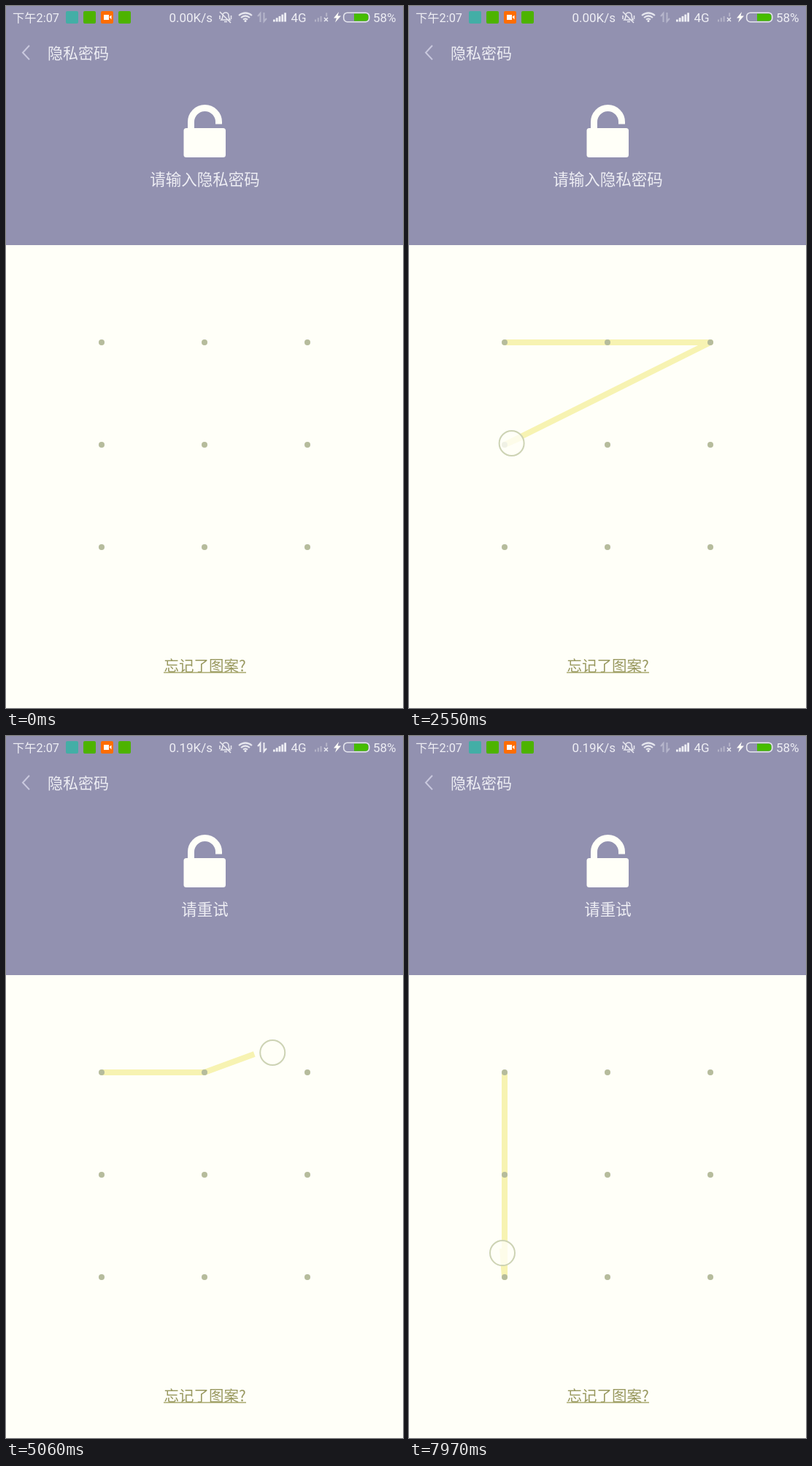
An HTML page for the animation above (8 s loop, 544 by 960 pixels).

```html
<!DOCTYPE html>
<html lang="zh-CN">
<head>
<meta charset="utf-8">
<title>隐私密码</title>
<style>
  html, body { margin: 0; width: 100%; height: 100%; overflow: hidden; background: #fffff8; }
  svg { display: block; width: 544px; height: 960px; }
  text { font-family: Roboto, "Noto Sans CJK SC", "Noto Sans CJK", sans-serif; fill: #eeeef4; }
  .status text { font-size: 17px; }
  .cjk { font-family: "Noto Sans CJK SC", "Noto Sans CJK", sans-serif; }
  .line { fill: none; stroke: #f7f3b2; stroke-width: 8; stroke-linejoin: round; }
  .thin { fill: none; stroke: #e6e6ee; stroke-width: 1.6; }
</style>
</head>
<body>
<svg viewBox="0 0 544 960">
  <rect width="544" height="960" fill="#fffff8"/>
  <rect width="544" height="327" fill="#9291b0"/>

  <g class="status">
    <text x="9" y="21.5" style="font-size:16.3px">下午2:07</text>
    <rect x="82" y="7" width="17" height="17" rx="2" fill="#43aea6"/>
    <rect x="106" y="7" width="17" height="17" rx="2" fill="#4db300"/>
    <rect x="130" y="7" width="17" height="17" rx="2" fill="#ff6d00"/>
    <path d="M134 12h7v7h-7zM141.500 15l3-2.500v6z" fill="#fffff8"/>
    <rect x="154" y="7" width="17" height="17" rx="2" fill="#4db300"/>
    <text id="speed" x="283" y="21.500" text-anchor="end"></text>

    <g class="thin">
      <path d="M295 19q2-2 2-6a4 4 0 0 1 8 0q0 4 2 6zM299 21.500h4M293 8l15 15M293 13v5M308.500 13v5"/>
      <path d="M319 13q9-7 18 0M322 16q6-5 12 0M325 18.700q3-2.500 6 0" stroke-width="2.200"/>
    </g>
    <circle cx="328" cy="20.500" r="1.500" fill="#eeeef4"/>
    <path id="arrows" d="M348.500 22V10l-3.500 4M353.500 9v12l3.500-4" fill="none" stroke="#eeeef4" stroke-width="2"/>
    <g id="bars" fill="#eeeef4"></g>
    <text x="390.500" y="21.500">4G</text>
    <g id="noBars" fill="#b5b4c8"></g>
    <path d="M436 16l5 5M441 16l-5 5" class="thin"/>
    <path d="M456 8l-7 8.500h4l-2 6 8-9h-4.500z" fill="#fffff8"/>
    <rect x="462.700" y="9.200" width="35" height="12.500" rx="5" class="thin"/>
    <path d="M477 10.500h15.500q4 0 4 4v2q0 4-4 4H477z" fill="#45bd00"/>
    <text x="503" y="21.500">58%</text>
  </g>

  <path d="M32 54l-9 9.700 9 9.700" fill="none" stroke="#c9c8de" stroke-width="2"/>
  <text class="cjk" x="57" y="72" font-size="21" font-weight="500">隐私密码</text>
  <rect x="243.500" y="167" width="57.500" height="40" rx="3.500" fill="#fffff8"/>
  <path d="M253.500 168v-9.500a19 19 0 0 1 38 0v3" fill="none" stroke="#fffff8" stroke-width="9"/>
  <text id="message" class="cjk" x="272.500" y="244.500" font-size="21.500" font-weight="300" text-anchor="middle"></text>

  <polyline id="trail" class="line"/>
  <g id="dots" fill="#b6bc9c"></g>
  <circle id="touch" r="17" fill="#fffff8" fill-opacity=".8" stroke="#cdd3b4" stroke-width="2"/>

  <text class="cjk" x="272.500" y="909.500" font-size="20.500" font-weight="300" text-anchor="middle" style="fill:#98985f">忘记了图案?</text>
  <path d="M216 911.500h113" stroke="#a9a96e" stroke-width="1.300"/>
</svg>
<script>
const LOOP = 8000, LAG = 90, REACH = 42;
const $ = id => document.getElementById(id);

function add(parent, tag, attrs) {
  const el = document.createElementNS("http://www.w3.org/2000/svg", tag);
  for (const key in attrs) el.setAttribute(key, attrs[key]);
  parent.append(el);
}

const grid = [];
for (const y of [460, 600, 740])
  for (const x of [131, 272, 413]) grid.push([x, y]);
grid.forEach(([cx, cy]) => add($("dots"), "circle", { cx, cy, r: 4 }));

for (let i = 0; i < 5; i++) {
  const height = 3 + i * 2.3;
  add($("bars"), "rect", { x: 366 + i * 3.8, y: 21.5 - height, width: 2.8, height });
  if (i < 3 || i === 4)
    add($("noBars"), "rect", { x: 423 + i * 3.8, y: 21.5 - height, width: 2, height: i === 4 ? 5 : height });
}

// Finger gestures: [time, x, y]
const gestures = [
  [[350, 131, 460], [680, 236, 458], [770, 249, 456], [1200, 350, 455], [1630, 437, 458],
   [1850, 376, 482], [1940, 341, 498], [2500, 142, 596], [2650, 138, 602],
   [3140, 288, 602], [3230, 300, 603], [3500, 400, 602], [4080, 407, 602]],
  [[4480, 131, 462], [4970, 340, 435], [5060, 365, 433], [5350, 436, 450], [5600, 350, 495],
   [5900, 195, 575], [6010, 165, 592], [6100, 152, 599], [6200, 145, 602],
   [6550, 411, 602], [6750, 445, 603], [6900, 445, 603]],
  [[7250, 131, 462], [7600, 128, 570], [7870, 128, 700], [7970, 128, 707], [8000, 128, 709]]
];

function position(keys, t) {
  if (t <= keys[0][0]) return keys[0].slice(1);
  const i = keys.findIndex(key => key[0] > t);
  if (i < 0) return keys[keys.length - 1].slice(1);
  const [t0, x0, y0] = keys[i - 1], [t1, x1, y1] = keys[i];
  const p = (t - t0) / (t1 - t0);
  return [x0 + (x1 - x0) * p, y0 + (y1 - y0) * p];
}

// Dots join the pattern in the order the finger reaches them.
function reachedDots(keys, until) {
  const found = new Set();
  for (let t = keys[0][0]; t <= until; t += 10) {
    const [x, y] = position(keys, t);
    for (const dot of grid)
      if (Math.abs(x - dot[0]) < REACH && Math.abs(y - dot[1]) < REACH) found.add(dot);
  }
  return [...found];
}

function draw(t) {
  const keys = gestures.filter(g => g[0][0] <= t).pop();
  let points = [], down = false;
  if (keys) {
    const end = keys[keys.length - 1][0];
    down = t < end;
    points = reachedDots(keys, Math.min(t - LAG, end));
    if (down) {
      if (points.length) points.push(position(keys, t - LAG));
      const [x, y] = position(keys, t);
      $("touch").setAttribute("cx", x);
      $("touch").setAttribute("cy", y);
    }
  }
  $("touch").style.display = down ? "" : "none";
  $("trail").setAttribute("points", points.join(" "));
  $("message").textContent = t < 4080 ? "请输入隐私密码" : "请重试";
  $("speed").textContent = t < 4500 ? "0.00K/s" : "0.19K/s";
  $("arrows").style.opacity = t >= 4500 && t < 7600 ? 1 : 0.4;
}

const start = performance.now();
function tick() {
  draw((performance.now() - start) % LOOP);
  requestAnimationFrame(tick);
}
tick();
</script>
</body>
</html>
```
